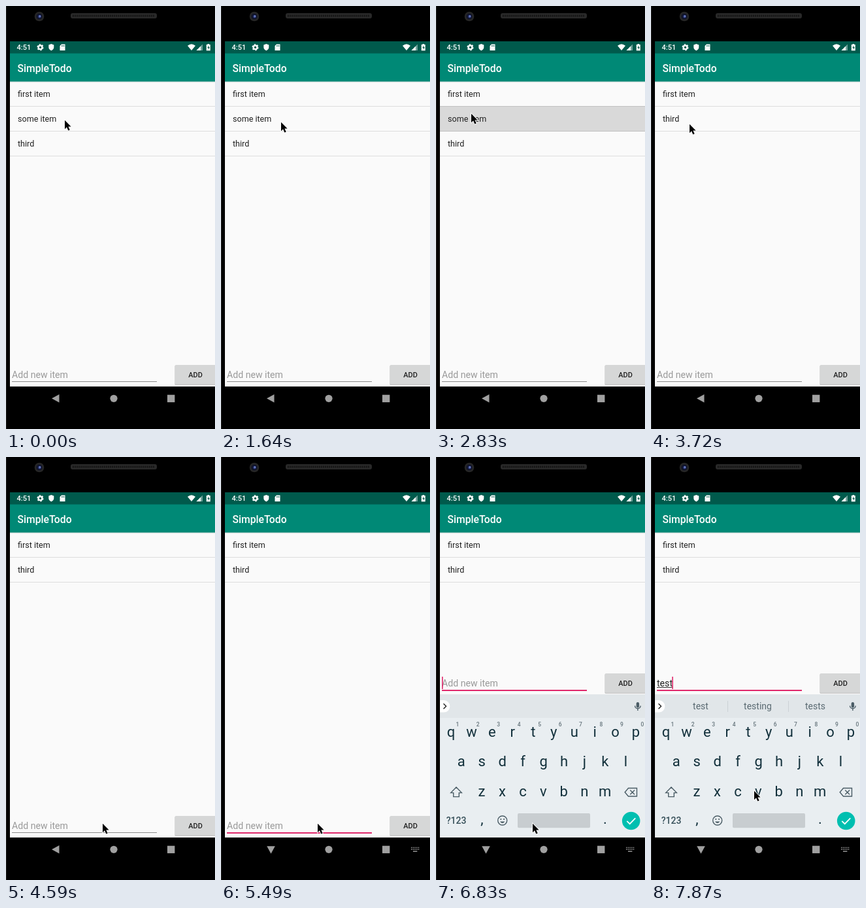
Write an HTML page that moves like this. It is 320 px wide and 647 px high and loops after 8 s.

```html
<!DOCTYPE html>
<html lang="en">
<head>
<meta charset="utf-8">
<title>Todo list demo</title>
<style>
  html, body { margin: 0; width: 100%; height: 100%; overflow: hidden; background: #000; }
  svg { display: block; width: 100vw; height: 100vh; }
  text { font-family: Roboto, sans-serif; white-space: pre; }
  .item { font-size: 12.56px; fill: #212121; }
  .field { font-size: 14.13px; }
  .medium { font-weight: 500; }
  .mid { text-anchor: middle; }
  .key { font-size: 22px; fill: #12303b; }
  .digit { font-size: 8.5px; font-weight: 500; fill: #66757c; }
  .small { font-size: 14px; fill: #37505a; }
  .word { font-size: 14px; fill: #5a6a72; }
  .icon { fill: none; stroke: #4a5c65; stroke-width: 1.4; }
</style>
</head>
<body>
<svg viewBox="0 0 320 647">
  <rect width="320" height="647"/>
  <path d="M.5 0V647" stroke="#1c1c1c"/>

  <!-- camera and speaker -->
  <circle cx="51" cy="16" r="7.3" fill="#262626"/>
  <circle cx="51" cy="16" r="4.6" fill="#10142c"/>
  <circle cx="51.5" cy="16" r="2.2" fill="#3c4d96"/>
  <circle cx="52" cy="15.5" r=".9" fill="#98a6dd"/>
  <rect x="99" y="11" width="132" height="8" rx="3" fill="#292929"/>
  <path d="M102 15H228" stroke="#161616" stroke-width="3" stroke-dasharray="2 1"/>

  <!-- app -->
  <rect x="6" y="54" width="314" height="528" fill="#fafafa"/>
  <rect x="6" y="115" width="314" height="1.5" fill="#cfd6d5"/>
  <rect x="6" y="72" width="314" height="43.5" fill="#008976"/>
  <rect x="6" y="54" width="314" height="18.5" fill="#005a4c"/>
  <text x="17.5" y="100.5" class="medium" font-size="15.7" fill="#fff">SimpleTodo</text>
  <text x="16.5" y="67.3" class="medium" font-size="11" fill="#fff">4:51</text>
  <g fill="#fff">
    <circle cx="52.5" cy="63.2" r="2.9" fill="none" stroke="#fff" stroke-width="2.3"/>
    <circle cx="52.5" cy="63.2" r="4.4" fill="none" stroke="#fff" stroke-width="1.4" stroke-dasharray="2.3 2.3"/>
    <path d="M69.3 58l4 1.6v3.4q0 3.6-4 5.2q-4-1.6-4-5.2v-3.4z"/>
    <path d="M85 58.5h5.5v9.6h-8v-7z"/>
    <path d="M85.5 60v2M87.2 60v2M88.9 60v2" stroke="#005a4c" stroke-width=".8"/>
    <path d="M278 60.8q6-5 12 0l-6 7.2z"/>
    <path d="M301 58.5v9.5h-9.5z" opacity=".45"/>
    <path d="M298 61.5v6.5h-6.5z"/>
    <path d="M308.5 58h2.6v1h1.7v9.2h-6v-9.2h1.7z"/>
    <path d="M310.5 60.4l-2.2 3.6h1.5v2.8l2.2-3.8h-1.5z" fill="#005a4c"/>
  </g>

  <path d="M6 153.5H320M6 191.5H320" stroke="#dedede"/>
  <path id="lastLine" d="M6 229.5H320" stroke="#dedede"/>
  <rect id="press" x="6" y="153" width="314" height="39" fill="#000"/>
  <text x="18" y="139" class="item">first item</text>
  <text id="second" x="18" y="177" class="item"></text>
  <text id="third" x="18" y="215" class="item">third</text>

  <g id="form">
    <text id="field" x="9" y="569" class="field"></text>
    <path id="compose" stroke="#333"/>
    <path id="underline" d="M9 574.5H231"/>
    <rect id="caret" y="554" width="1.6" height="19" fill="#e0286b"/>
    <rect x="258.5" y="549.5" width="64" height="30.3" rx="1.5" fill="#bdbdbd"/>
    <rect x="259" y="549" width="64" height="29.8" rx="1.5" fill="#d6d7d7"/>
    <text x="290" y="567.8" class="mid medium" font-size="11" fill="#212121">ADD</text>
  </g>

  <g id="keyboard">
    <rect x="6" y="363" width="314" height="230" fill="#e9eef1"/>
    <rect x="6" y="363" width="314" height="36" fill="#e1e6e9"/>
    <path d="M6 372h6a9.3 9.3 0 0 1 0 18.6h-6z" fill="#fff"/>
    <path d="M11.5 377.2l4 4-4 4" class="icon" style="stroke:#222"/>
    <rect x="306.7" y="375" width="4.4" height="8.4" rx="2.2" fill="#4a5c65"/>
    <path d="M304.6 380.5a4.3 4.3 0 0 0 8.6 0M308.9 385v3" class="icon" stroke-width="1.2"/>
    <g id="words">
      <path d="M117.5 373V390M210.5 373V390" stroke="#cbd1d5"/>
      <text x="76" y="386" class="word mid"></text>
      <text x="163.5" y="386" class="word mid"></text>
      <text x="251.5" y="386" class="word mid"></text>
    </g>
    <g id="keys"></g>
    <path d="M31 505l8.3 8.6h-4v6h-8.6v-6h-4z" class="icon"/>
    <path d="M294.5 506.5h13v12.5h-13l-5.3-6.2z" class="icon"/>
    <path d="M297.3 509.4l6.8 6.8M304.1 509.4l-6.8 6.8" class="icon"/>
    <text x="31" y="561" class="small mid medium">?123</text>
    <circle cx="101.7" cy="556" r="7" class="icon"/>
    <path d="M98 557.6q3.7 5 7.4 0z" fill="#4a5c65"/>
    <circle cx="99.3" cy="554" r="1.1" fill="#4a5c65"/>
    <circle cx="104.1" cy="554" r="1.1" fill="#4a5c65"/>
    <rect x="125" y="545" width="111" height="22.3" rx="2" fill="#c8cdd0"/>
    <circle cx="298.7" cy="556.5" r="13.8" fill="#00bfb0"/>
    <path d="M292.3 556.8l4.4 4.4 8.6-8.8" fill="none" stroke="#fff" stroke-width="1.8"/>
  </g>

  <!-- navigation bar -->
  <rect x="6" y="582" width="314" height="65"/>
  <g fill="#a0a0a0">
    <path id="back" d="M70 600.3l11.5-6.3v12.6z"/>
    <circle cx="165" cy="600.3" r="5.6"/>
    <rect x="247" y="594.7" width="11.4" height="11.4"/>
    <g id="imeIcon" stroke="#a0a0a0" stroke-width="1.4">
      <path d="M291 597.4h12.4M291 600h12.4" stroke-dasharray="1.5 1.2"/>
      <path d="M294 603.2h6.4"/>
    </g>
  </g>

  <path id="mouse" d="M1 .8V14.2l3-2.9 2.3 5.2 2.4-1-2.3-5.1h4.2z" stroke="#fff" stroke-width="1.6" paint-order="stroke"/>
</svg>
<script>
const $ = id => document.getElementById(id);
const LOOP = 8000;

// Lay out the letter keys.
let keys = "";
const addKey = (x, y, label, style = "key mid") =>
  keys += `<text x="${x}" y="${y}" class="${style}">${label}</text>`;
const PITCH = 31.45;
[["qwertyuiop", 23, 428], ["asdfghjkl", 38.8, 473], ["zxcvbnm", 70, 519]].forEach(([row, x, y]) =>
  [...row].forEach((letter, i) => addKey(x + i * PITCH, y, letter)));
[..."1234567890"].forEach((d, i) => addKey(32.8 + i * PITCH, 412.3, d, "digit mid"));
addKey(70.5, 561, ",");
addKey(259, 561, ".");
$("keys").innerHTML = keys;

// Each track lists [start time, value]; values hold until the next start.
const tracks = {
  mouse: [
    [0, [89, 174]], [440, [90, 174]], [1640, [91, 177]], [1790, [90, 176]],
    [2090, [80, 172]], [2240, [60, 165]], [2380, [53, 164]],
    [3720, [58, 180]], [3870, [95, 290]], [4020, [170, 450]], [4170, [235, 565]],
    [4310, [241, 574]], [4460, [175, 564]], [4590, [147, 560]], [7870, [157, 510]]
  ],
  press: [[0, 0], [2680, .07], [2830, .135], [3120, 0]],
  slide: [[0, null], [5640, 60], [5780, 12], [5930, 1], [6080, 0]],
  backTurn: [[0, 0], [5340, -50], [5490, -90]],
  caret: [[0, false], [5780, true], [6230, false], [6830, true]],
  typed: [[0, ""], [7120, "t"], [7270, "te"], [7420, "tes"], [7570, "test"]]
};
const suggestions = {
  t: ["t", "the", "to"],
  te: ["te", "the", "tell"],
  tes: ["tes", "test", "yes"],
  test: ["test", "testing", "tests"]
};
const at = (name, t) => tracks[name].findLast(([start]) => start <= t)[1];
const show = (id, on) => $(id).style.display = on ? "" : "none";
const set = (id, attrs) => Object.entries(attrs).forEach(([k, v]) => $(id).setAttribute(k, v));

function draw(t) {
  const removed = t >= 3120, focused = t >= 4740;
  const typed = at("typed", t), slide = at("slide", t), turn = at("backTurn", t);

  set("mouse", { transform: `translate(${at("mouse", t)})` });
  set("press", { opacity: at("press", t) });
  $("second").textContent = removed ? "third" : "some item";
  show("third", !removed);
  show("lastLine", !removed);

  set("form", { transform: `translate(0 ${slide === null ? 0 : -218})` });
  $("field").textContent = typed || "Add new item";
  set("field", { fill: typed ? "#212121" : "#999" });
  set("underline", focused
    ? { stroke: "#e0286b", "stroke-width": 2, transform: "translate(0 .5)" }
    : { stroke: "#8c8c8c", "stroke-width": 1, transform: "" });
  const end = typed ? 9 + $("field").getComputedTextLength() : 9;
  set("caret", { x: end - (typed ? .8 : 0) });
  show("caret", at("caret", t));
  set("compose", { d: typed ? `M9 570.5H${end}` : "" });

  show("keyboard", slide !== null);
  set("keyboard", { transform: `translate(0 ${slide || 0})` });
  show("words", typed);
  if (typed) document.querySelectorAll(".word").forEach((word, i) =>
    word.textContent = suggestions[typed][i]);

  set("back", { transform: `rotate(${turn} 76.5 600.3)` });
  show("imeIcon", turn === -90);
}

function frame() {
  draw(performance.now() % LOOP);
  requestAnimationFrame(frame);
}
frame();
</script>
</body>
</html>
```
